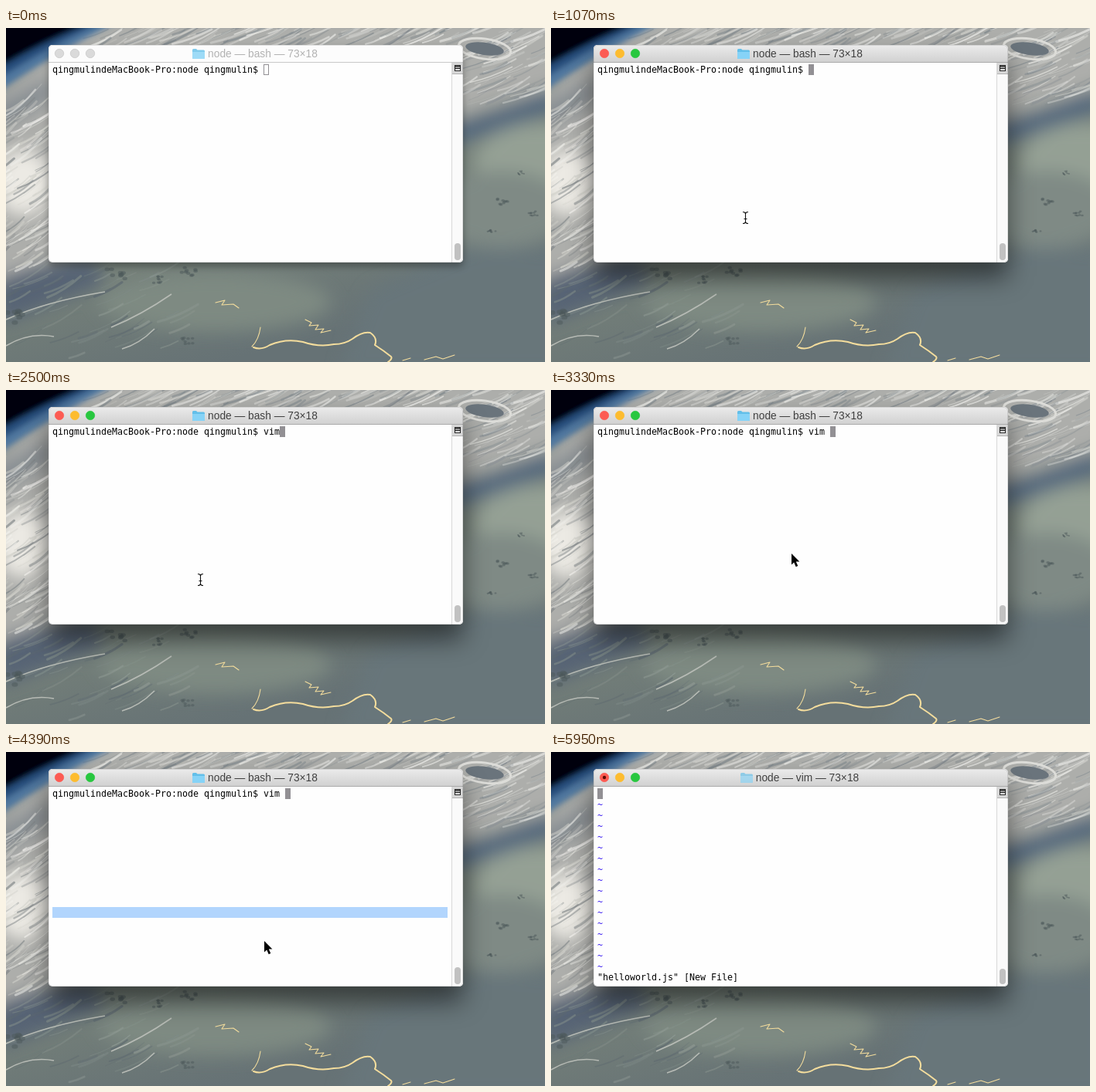
Recreate the animation shown at these times as an HTML page. Size 697 px wide and 433 px high, loop 8000 ms.

```html
<!DOCTYPE html>
<html lang="en">
<head>
<meta charset="utf-8">
<title>Terminal session</title>
<style>
  html, body { margin: 0; width: 100%; height: 100%; overflow: hidden; background: #6c777a; }
  svg { display: block; width: 697px; height: 433px; }
  text { white-space: pre; }
  .mono { font: 11.63px "DejaVu Sans Mono", monospace; }
  .title { font: 13.75px "Liberation Sans", sans-serif; text-anchor: middle; }
  .menu { font: 14px "Noto Sans CJK SC", "Noto Sans CJK", sans-serif; fill: #3c3c3c; }
  .ime { font: 17px "Open Sans", "Noto Sans", sans-serif; fill: #1c94cc; }
</style>
</head>
<body>
<svg viewBox="0 0 697 433" xmlns="http://www.w3.org/2000/svg">
  <defs>
    <filter id="soft" x="-50%" y="-50%" width="200%" height="200%"><feGaussianBlur stdDeviation="11"/></filter>
    <filter id="haze" x="-20%" y="-20%" width="140%" height="140%"><feGaussianBlur stdDeviation="3.5"/></filter>
    <filter id="wisp" x="-5%" y="-5%" width="110%" height="110%"><feGaussianBlur stdDeviation=".7"/></filter>
    <filter id="deep" x="-20%" y="-30%" width="140%" height="170%"><feGaussianBlur stdDeviation="16"/></filter>
    <filter id="near" x="-10%" y="-20%" width="120%" height="140%"><feGaussianBlur stdDeviation="5"/></filter>
    <filter id="lift" x="-20%" y="-20%" width="140%" height="160%"><feDropShadow dx="0" dy="1.5" stdDeviation="1.5" flood-opacity=".5"/></filter>
    <linearGradient id="bar" x2="0" y2="1"><stop stop-color="#ebebeb"/><stop offset="1" stop-color="#d1d1d1"/></linearGradient>
    <linearGradient id="candy" x2="0" y2="1"><stop stop-color="#f8f8f8"/><stop offset="1" stop-color="#dadada"/></linearGradient>
    <linearGradient id="sea" x2=".4" y2="1"><stop stop-color="#818b87"/><stop offset=".7" stop-color="#758079"/><stop offset="1" stop-color="#667275"/></linearGradient>
    <clipPath id="frame"><rect x="55" y="22" width="536" height="282" rx="5"/></clipPath>
  </defs>

  <g id="wallpaper">
    <rect width="697" height="433" fill="url(#sea)"/>
    <g filter="url(#soft)">
      <ellipse cx="690" cy="175" rx="85" ry="52" fill="#94a094"/>
      <ellipse cx="640" cy="235" rx="90" ry="50" fill="#7f8a85"/>
      <ellipse cx="270" cy="355" rx="150" ry="38" fill="#7e8a82"/>
      <path d="M430 450L470 340L600 285H720V450Z" fill="#67767a"/>
      <path d="M-20 90L110 -20H720V72L570 120L60 300L-20 330Z" fill="#adaeab"/>
      <path d="M575 138Q640 122 710 92" fill="none" stroke="#53677e" stroke-width="26"/>
      <ellipse cx="22" cy="200" rx="36" ry="42" fill="#eceae4"/>
      <path d="M-20 104L60 62V92L-20 140Z" fill="#838a90"/>
      <path d="M-10 325Q60 300 110 300L130 330L-10 385Z" fill="#566375"/>
    </g>
    <g id="clouds" fill="none" stroke-linecap="round" filter="url(#wisp)"></g>
    <g filter="url(#haze)">
      <path d="M-9 -9H146Q56 36 -9 82Z" fill="#50779f"/>
      <path d="M-9 -9H128Q52 26 -9 66Z" fill="#274d7c"/>
      <path d="M-9 -9H117Q46 18 -9 52Z" fill="#02040a"/>
    </g>
    <g filter="url(#wisp)" fill="none">
      <ellipse cx="619" cy="27" rx="34" ry="13" transform="rotate(8 619 27)" stroke="#dcdcd8" stroke-width="3"/>
      <ellipse cx="619" cy="27" rx="25" ry="8" transform="rotate(8 619 27)" fill="#6a747c"/>
      <path d="M136 388Q175 372 214 345M150 416Q172 410 192 390M0 412Q30 394 62 400M0 378Q50 355 128 342" stroke="#b7bbb5" stroke-width="1.6"/>
    </g>
    <g id="islets" fill="#4c585a" filter="url(#wisp)"></g>
    <g fill="none" stroke="#f4dd9d" stroke-linecap="round" stroke-linejoin="round">
      <path stroke-width="2" d="M320 414Q330 418 341 411Q362 402 384 407Q405 414 424 410Q438 410 448 403Q461 393 471 395Q481 402 477 411Q488 418 498 426Q500 429 494 433"/>
      <path stroke-width="1.1" d="M318 413Q327 404 329 388M387 378L395 382L392 386L404 385L400 391L411 390L407 395L420 392M271 356L283 353L279 359L294 358L301 363M541 430L556 426L565 429L580 424M513 431L523 428"/>
    </g>
  </g>

  <g id="shadowOn" filter="url(#deep)"><rect x="55" y="42" width="536" height="282" rx="5" opacity=".5"/></g>
  <g id="shadowOff" filter="url(#near)"><rect x="55" y="27" width="536" height="282" rx="5" opacity=".32"/></g>

  <g clip-path="url(#frame)">
    <rect x="55" y="22" width="536" height="282" fill="#fefefe"/>
    <rect id="titlebar" x="55" y="22" width="536" height="22"/>
    <path id="rule" d="M55 44.5H591"/>
    <rect x="576" y="45" width="15" height="259" fill="#fafafa"/>
    <path d="M576.5 45V304" stroke="#d8d8d8"/>
    <rect x="577" y="45" width="14" height="15" fill="#d6d6d6"/>
    <path d="M577 59.5H591" stroke="#b4b4b4"/>
    <rect x="580.5" y="48.5" width="7" height="7" fill="#fff" stroke="#222"/>
    <path d="M580 50H588M581 52.5H587" stroke="#222" stroke-width="1.4"/>
    <rect id="thumb" x="580" width="8" rx="4" fill="#c1c1c1"/>
  </g>
  <rect x="55.5" y="22.5" width="535" height="281" rx="5" fill="none" stroke="#000" stroke-opacity=".1"/>
  <g id="lights"></g>
  <circle id="edited" cx="69" cy="33" r="2.2" fill="#5c0a06"/>
  <g id="folder">
    <path d="M0 1.5Q0 0 1.5 0H5L6.5 1.5H14.5Q16 1.5 16 3V11.5Q16 13 14.5 13H1.5Q0 13 0 11.5Z" fill="#62bfe9"/>
    <path d="M0 4H16V11.5Q16 13 14.5 13H1.5Q0 13 0 11.5Z" fill="#86d3f7"/>
  </g>
  <text id="title" class="title" y="38"></text>

  <rect id="selection" x="60" y="201" width="511" height="14" fill="#b1d5fd"/>
  <rect id="block" width="7" height="14" fill="#929094"/>
  <rect id="hollow" x="333.5" y="47.5" width="6" height="13" fill="none" stroke="#929094"/>
  <text id="line" class="mono" x="60" y="58"></text>
  <g id="vim" class="mono"></g>

  <g id="preedit">
    <path id="underline" stroke="#111" stroke-width="1.5"/>
    <path id="caret" stroke="#777"/>
    <rect id="bubble" x="321.5" y="65.5" height="34" rx="5" fill="url(#candy)" stroke="#b9b9b9" stroke-width=".6" filter="url(#lift)"/>
    <text id="candidates" class="ime" x="333.5" y="89"></text>
    <path id="arrows" d="M4 -4L0 0L4 4M11 -4L15 0L11 4" fill="none" stroke="#a3a3a3" stroke-width="2"/>
  </g>

  <g id="menu">
    <rect x="305.5" y="210" width="125.5" height="87" rx="11" opacity=".075"/>
    <rect x="313" y="209" width="110" height="77.5" rx="5" fill="#efefef" stroke="#000" stroke-opacity=".2" stroke-width=".7" filter="url(#lift)"/>
    <rect id="hover" x="313" width="110" height="19" fill="#388efc"/>
    <path d="M313 257H423" stroke="#d9d9d9" stroke-width="2"/>
    <text id="copy" class="menu" x="334" y="227">拷贝</text>
    <text id="paste" class="menu" x="334" y="246">粘贴</text>
    <text class="menu" x="334" y="277">显示查看器</text>
  </g>

  <path id="ibeam" d="M-3.5 -7.5Q-.5 -7.5 0 -5.5Q.5 -7.5 3.5 -7.5M0 -6V6M-3.5 7.5Q-.5 7.5 0 5.5Q.5 7.5 3.5 7.5M-2 1.5H2" fill="none" stroke="#111" stroke-width="1.1"/>
  <path id="arrow" d="M0 0V14.5L3.2 11.5L5.7 17.2L8.3 16.1L5.8 10.5H10.4Z" stroke="#fff" stroke-width="1.6" paint-order="stroke"/>
</svg>
<script>
const LOOP = 8000;
const CHAR = 7, ROW = 14, LEFT = 60, TOP = 47;
const PROMPT = 'qingmulindeMacBook-Pro:node qingmulin$ ';
const $ = id => document.getElementById(id);
const set = (id, attrs) => { for (const k in attrs) $(id).setAttribute(k, attrs[k]); };
const show = (id, on) => set(id, { visibility: on ? 'visible' : 'hidden' });
const move = (id, x, y) => set(id, { transform: `translate(${x} ${y})` });

// Value of the last step reached at time t.
const step = (t, steps) => steps.reduce((v, [from, next]) => t >= from ? next : v, steps[0][1]);

let seed = 11;
const rand = () => (seed = seed * 16807 % 2147483647) / 2147483647;

function streaks(x, y, w, h, count, length, slope, tones) {
  let out = '';
  for (let i = 0; i < count; i++) {
    const px = x + rand() * w, py = y + rand() * h, len = length * (.4 + rand());
    const dy = -len * slope * (.7 + rand() * .6);
    const tone = tones[Math.floor(rand() * tones.length)];
    out += `<path d="M${px} ${py}q${len * .5} ${dy * .3} ${len} ${dy}" stroke="${tone}"
      stroke-width="${.6 + rand() * 2.6}" opacity="${.2 + rand() * .5}"/>`;
  }
  return out;
}

function islet(x, y, size) {
  let out = '';
  for (let i = 0; i < 9; i++) {
    out += `<ellipse cx="${x + (rand() - .5) * size * 1.8}" cy="${y + (rand() - .5) * size}"
      rx="${size * .25}" ry="${size * .18}" opacity=".5"/>`;
  }
  return out;
}

$('clouds').innerHTML =
  streaks(100, 0, 480, 30, 120, 45, .5, ['#f2f2ee', '#d5d5d1', '#7d858a']) +
  streaks(570, 0, 120, 100, 70, 50, .45, ['#f0f0ec', '#cfd0cc', '#838b90']) +
  streaks(-30, 100, 70, 215, 120, 40, .7, ['#f7f6f2', '#d0d0ca', '#808688']) +
  streaks(-20, 320, 240, 110, 50, 38, .5, ['#939d97', '#7f8b88', '#5d6970']);
$('islets').innerHTML = [[15, 374, 16], [142, 319, 13], [237, 316, 11], [196, 326, 9],
  [234, 405, 9], [666, 188, 5], [641, 225, 9], [682, 240, 7], [628, 262, 6]]
  .map(p => islet(...p)).join('');
$('lights').innerHTML = [69, 89, 109].map(x => `<circle cx="${x}" cy="33" r="5.7"/>`).join('');
$('vim').innerHTML = Array.from({ length: 16 }, (_, i) =>
  `<text x="${LEFT}" y="${72 + i * ROW}" fill="#3a1cf0">~</text>`).join('') +
  `<text x="${LEFT}" y="296">"helloworld.js" [New File]</text>`;

const TYPED = [[0, ''], [1790, 'vi'], [1900, 'vim'], [2860, 'vim '], [4510, 'vim helloworld.js']];
const CANDIDATES = [[0, ''], [1790, '1.v'], [1900, '1.vi'], [2020, '1.vim 2.vi'], [2500, '']];
const BUBBLE = [[0, 75], [1900, 80], [2020, 126]];
const HOVER = [[0, 0], [3690, 1], [3800, 2], [4160, 0], [4270, 2]];
const POINTER = [
  [0, null], [600, ['arrow', 18, 358]], [710, ['ibeam', 118, 300]], [830, ['ibeam', 218, 260]],
  [950, ['ibeam', 251.5, 246]], [2980, ['ibeam', 270, 246]], [3090, ['ibeam', 296, 244]],
  [3210, ['ibeam', 309, 230]], [3330, ['arrow', 311, 212]], [3690, ['arrow', 322, 228]],
  [3800, ['arrow', 334, 245]], [4510, ['ibeam', 334.5, 246]], [5950, null]
];

function drawWindow(t) {
  const active = t >= 1070, renamed = t >= 5350;
  show('shadowOn', active);
  show('shadowOff', !active);
  set('titlebar', { fill: active ? 'url(#bar)' : '#fcfcfc' });
  set('rule', { stroke: active ? '#aaa' : '#c9c9c9' });
  set('thumb', { y: renamed ? 281 : 279, height: renamed ? 20 : 22 });
  const colors = active ? ['#fc5b53', '#fdbc2f', '#28c73f'] : ['#dadada', '#dadada', '#dadada'];
  [...$('lights').children].forEach((dot, i) => {
    dot.setAttribute('fill', colors[i]);
    dot.setAttribute('stroke', active ? colors[i] : '#c6c6c6');
    dot.setAttribute('stroke-width', .7);
  });
  show('edited', renamed);
  $('title').textContent = `node — ${renamed ? 'vim' : 'bash'} — 73×18`;
  set('title', { x: renamed ? 331.5 : 332, fill: active ? '#404040' : '#b2b2b2' });
  set('folder', { opacity: renamed ? .65 : active ? 1 : .8 });
  move('folder', renamed ? 245 : 241, 27);
}

function drawTerminal(t) {
  const editing = t >= 5230, typed = step(t, TYPED), options = step(t, CANDIDATES);
  const end = LEFT + (PROMPT + typed).length * CHAR, start = LEFT + PROMPT.length * CHAR;
  $('line').textContent = editing ? '' : PROMPT + typed;
  show('vim', editing);
  show('hollow', t < 1070);
  show('block', t >= 1070 && t < 1550 || t >= 2500);
  set('block', { x: editing ? LEFT : end, y: TOP });
  show('selection', t >= 3450 && t < 4510);

  show('preedit', options);
  const width = step(t, BUBBLE);
  $('candidates').textContent = options;
  set('bubble', { width });
  set('underline', { d: `M${start} 60.25H${end}` });
  set('caret', { d: `M${end + .5} 47V61` });
  move('arrows', 321.5 + width - 27.5, 85);
}

function drawPointer(t) {
  const hover = step(t, HOVER), pointer = step(t, POINTER), open = t >= 3450 && t < 4390;
  show('menu', open);
  show('hover', open && hover);
  set('hover', { y: hover === 1 ? 213 : 232 });
  $('copy').style.fill = hover === 1 ? '#fff' : '';
  $('paste').style.fill = hover === 2 ? '#fff' : '';
  for (const id of ['ibeam', 'arrow']) show(id, pointer && pointer[0] === id);
  if (pointer) move(...pointer);
}

const CHANGES = [...new Set([TYPED, CANDIDATES, HOVER, POINTER].flat().map(s => s[0])
  .concat(1070, 1550, 3450, 4390, 5230, 5350))].sort((a, b) => a - b);
let drawn = -1;

function render(t) {
  const phase = CHANGES.filter(c => c <= t).length;
  if (phase === drawn) return;
  drawn = phase;
  drawWindow(t);
  drawTerminal(t);
  drawPointer(t);
}

function tick() {
  render(performance.now() % LOOP);
  requestAnimationFrame(tick);
}
tick();
</script>
</body>
</html>
```
